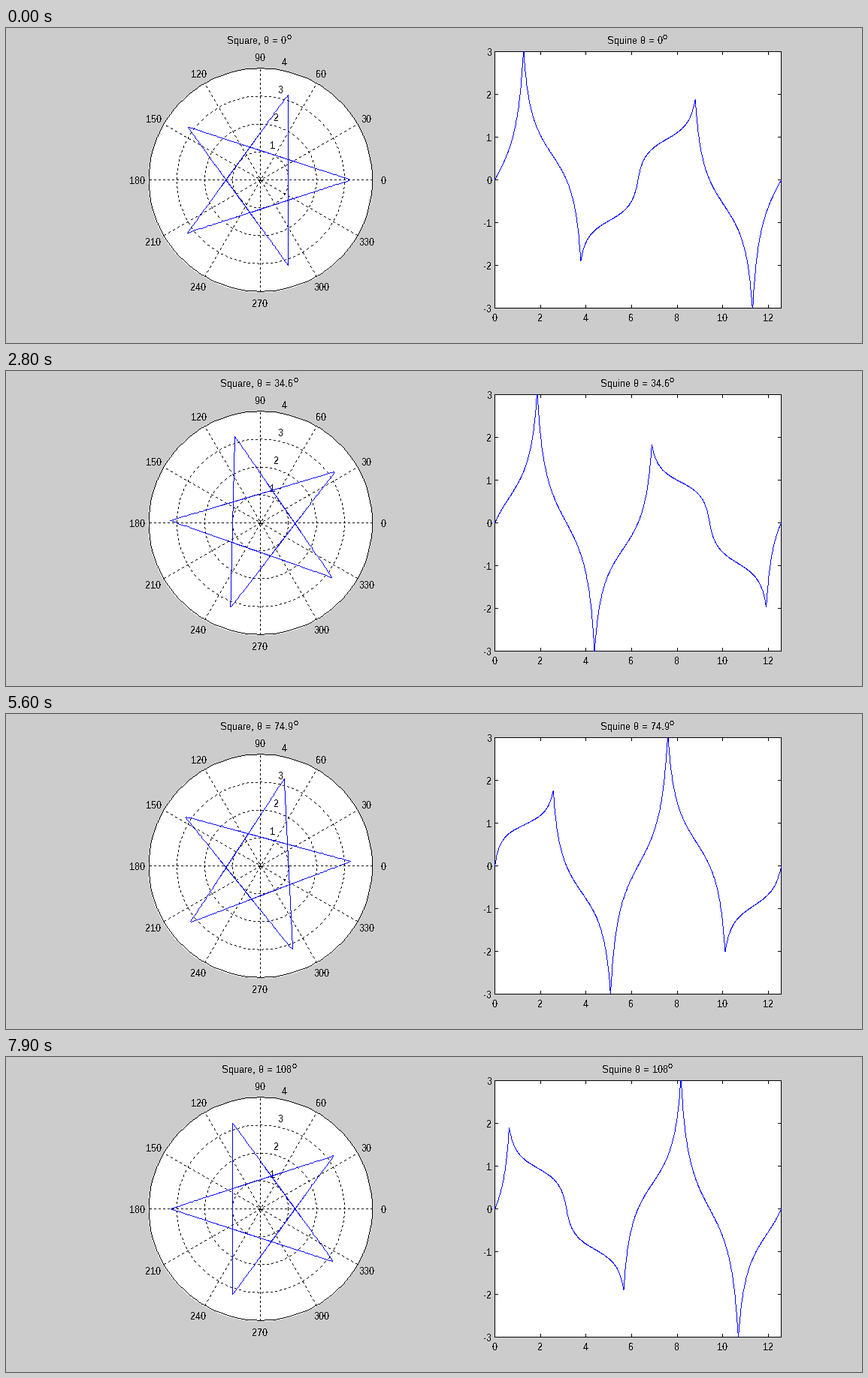
Recreate the animation shown at these times as a matplotlib script. Size 1139 px wide and 420 px high, loop 8000 ms.

```python
import numpy as np
import matplotlib.pyplot as plt
from matplotlib.animation import FuncAnimation
from matplotlib.patches import Polygon, Rectangle

WIDTH, HEIGHT, DPI = 1139, 420, 64
PX = 72 / DPI                                # points per pixel
FRAMES, INTERVAL, HOLD = 80, 100, 4          # hold: extra frames on the first pose
STEP = 1.44                                  # degrees turned per frame

CX, CY, RADIUS, R_MAX = 338.3, 203, 148.7, 4
LEFT, RIGHT, TOP, BOTTOM = 650, 1031, 32, 374
X_SCALE, Y_SCALE = (RIGHT - LEFT) / (4 * np.pi), (BOTTOM - TOP) / 6
FONT = 13 * PX

plt.rcParams.update({
    "font.family": "Liberation Sans",
    "text.hinting": "native",
    "text.hinting_factor": 1,
    "text.antialiased": False,
})

fig = plt.figure(figsize=(WIDTH / DPI, HEIGHT / DPI), dpi=DPI, facecolor="#cccccc")
ax = fig.add_axes([0, 0, 1, 1])
ax.set_axis_off()
# The quarter pixel keeps whole numbers safely inside their pixel.
ax.set_xlim(-0.25, WIDTH - 0.25)
ax.set_ylim(HEIGHT - 0.25, -0.25)


def rasterize(x, y):
    """Pixels of a one-pixel-wide polyline, one per step of its longer axis."""
    x, y = np.rint(x), np.rint(y)
    steps = np.maximum(abs(np.diff(x)), abs(np.diff(y)))
    distance = np.concatenate([[0], np.cumsum(steps)])
    along = np.arange(distance[-1] + 1)
    return (np.rint(np.interp(along, distance, x)),
            np.rint(np.interp(along, distance, y)))


def pixels(x, y, color="black", zorder=2):
    return ax.plot(x, y, ",", color=color, zorder=zorder)[0]


def line(x, y):
    return pixels(*rasterize(x, y))


def dotted_line(x, y):
    x, y = rasterize(x, y)
    on = np.arange(len(x)) % 6 < 3
    return pixels(x[on], y[on])


def label(x, y, text, ha="center"):
    return ax.text(x, round(y) + 5, text, fontsize=FONT, ha=ha,
                   va="baseline", zorder=3)


def polar(r, angle):
    scale = RADIUS / R_MAX
    return CX + scale * r * np.cos(angle), CY - scale * r * np.sin(angle)


def plot_x(t):
    return LEFT + X_SCALE * t


def plot_y(v):
    return CY - Y_SCALE * v


def draw_polar_grid():
    turn = np.linspace(0, 2 * np.pi, 101)
    rim = polar(R_MAX, turn)
    ax.add_patch(Polygon(np.column_stack(rim), fc="white", lw=0,
                         antialiased=False, zorder=1))
    line(*rim)
    for r in range(1, R_MAX + 1):
        if r < R_MAX:
            dotted_line(*polar(r, turn))
        label(349.4 + 5.17 * r, 193 - 36.9 * r, str(r))
    for degrees in range(30, 181, 30):
        dotted_line(*polar(np.array([-R_MAX, R_MAX]), np.radians(degrees)))
    for degrees in range(0, 360, 30):
        x, y = polar(1.1 * R_MAX, np.radians(degrees))
        label(x - 0.6, y, str(degrees))


def draw_plot_box():
    ax.add_patch(Rectangle((LEFT, TOP), RIGHT - LEFT, BOTTOM - TOP, fc="white",
                           lw=0, antialiased=False, zorder=1))
    line([LEFT, RIGHT, RIGHT, LEFT, LEFT], [TOP, TOP, BOTTOM, BOTTOM, TOP])
    for value in range(0, 13, 2):
        x = plot_x(value)
        line([x, x], [TOP, TOP + 4])
        line([x, x], [BOTTOM, BOTTOM - 4])
        label(x, 386, str(value))
    for value in range(-3, 4):
        y = plot_y(value)
        line([LEFT, LEFT + 4], [y, y])
        line([RIGHT, RIGHT - 4], [y, y])
        label(LEFT - 4, y, str(value), ha="right")


def make_title(x):
    title = label(x, 16, "")
    ax.annotate("o", (1, 15), xycoords=(title, "data"), fontsize=11 * PX,
                ha="left", va="baseline")
    return title


draw_polar_grid()
draw_plot_box()
star_title = make_title(333.5)
wave_title = make_title(836.7)
star = pixels([], [], "blue", zorder=4)
wave = pixels([], [], "blue", zorder=4)
t = np.arange(0, 4 * np.pi, 0.01)


def star_radius(angle):
    """Pentagram with inner radius 1: straight edges spanning 144 degrees."""
    edge = 4 * np.pi / 5
    return 1 / np.cos((angle + edge / 2) % edge - edge / 2)


def update(frame):
    theta = STEP * max(0, frame - HOLD)
    r = star_radius(t - np.radians(theta))
    star.set_data(*rasterize(*polar(r, t)))
    x, y = rasterize(plot_x(t), plot_y(r * np.sin(t)))
    inside = (y >= TOP) & (y <= BOTTOM)
    wave.set_data(x[inside], y[inside])
    star_title.set_text(f"Square, θ = {theta:.3g}")
    wave_title.set_text(f"Squine θ = {theta:.3g}")
    return star, wave, star_title, wave_title


animation = FuncAnimation(fig, update, frames=FRAMES, interval=INTERVAL,
                          repeat=True, repeat_delay=0, blit=False)
plt.show()
```
